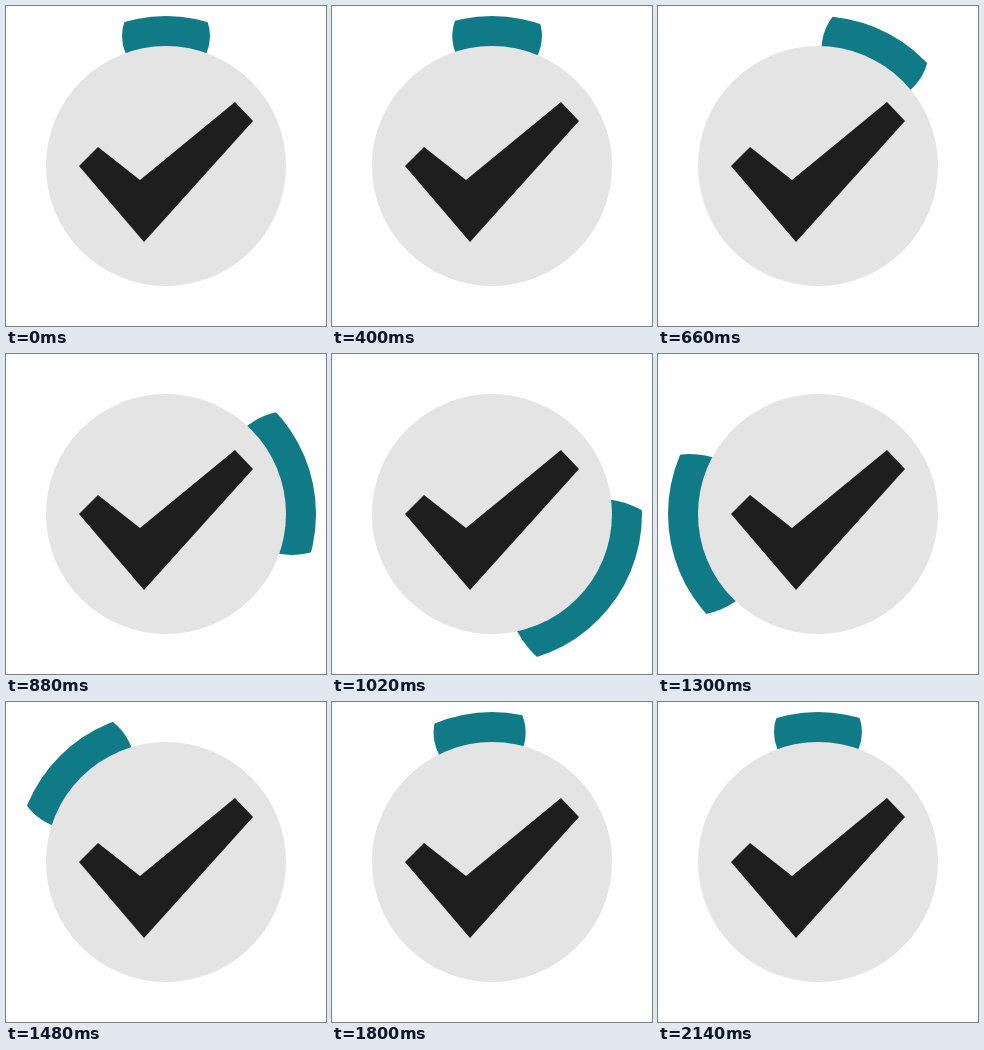
Write an HTML page that moves like this. It is 320 px wide and 320 px high and loops after 2.22 s.

```html
<!DOCTYPE html>
<html lang="en">
<head>
<meta charset="utf-8">
<title>Check mark</title>
<style>
  html, body { margin: 0; height: 100%; overflow: hidden; background: #fff; }
  svg { display: block; width: 100%; height: 100%; }
</style>
</head>
<body>
<svg viewBox="0 0 320 320">
  <clipPath id="rim"><circle cx="160" cy="160" r="150"/></clipPath>
  <g clip-path="url(#rim)"><circle id="blob" cx="160" cy="30" r="44" fill="#107a87"/></g>
  <circle cx="160" cy="160" r="120" fill="#e4e4e4"/>
  <path d="M73 160 92 141 134 174 229 96 247 115 138 236Z" fill="#1e1e1e"/>
</svg>
<script>
const LOOP = 2220, START = 240, MID = 1140;
const blob = document.getElementById('blob');

// Distance from the top: 0 at the top, 1 at the bottom.
function depth(t) {
  return t < MID
    ? Math.max(0, (t - START) / (MID - START)) ** 2.54
    : ((LOOP - t) / (LOOP - MID)) ** 3.69;
}

function draw(now) {
  const t = now % LOOP;
  const d = depth(t);
  const angle = Math.PI * (t < MID ? d : 2 - d);
  blob.setAttribute('cx', 160 + 130 * Math.sin(angle));
  blob.setAttribute('cy', 160 - 130 * Math.cos(angle));
  blob.setAttribute('r', 44 + 67 * d);
}

const begin = performance.now();
function tick() {
  draw(performance.now() - begin);
  requestAnimationFrame(tick);
}
tick();
</script>
</body>
</html>
```
